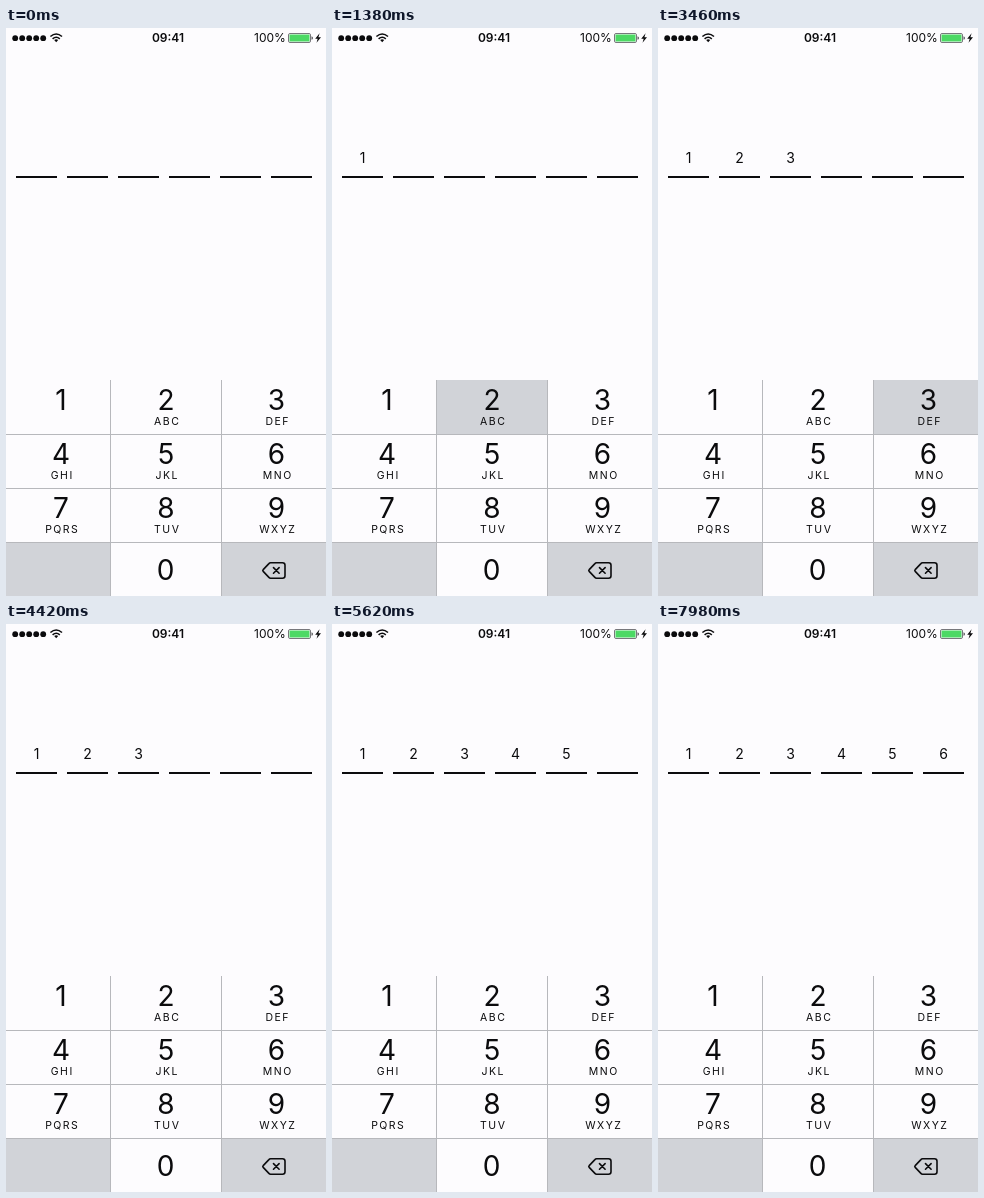
An HTML page for the animation above (8 s loop, 320 px wide and 568 px high).

```html
<!DOCTYPE html>
<html lang="en">
<head>
<meta charset="utf-8">
<title>Passcode entry</title>
<style>
html, body { margin: 0; height: 100%; overflow: hidden; background: #fdfcfe; }
svg { display: block; width: 320px; height: 568px; font-family: Inter, Roboto, sans-serif; fill: #0b0b0d; }
text { text-anchor: middle; }
.num { font-size: 28px; }
.abc { font-size: 10.5px; letter-spacing: 1.5px; }
.code { font-size: 14px; }
.bar { font-size: 12px; }
.key { fill: #d1d3d8; }
.line { fill: #b7b8bc; }
</style>
</head>
<body>
<svg id="stage" viewBox="0 0 320 568">
  <g id="dots"></g>
  <g fill="none" stroke="#0b0b0d" stroke-width="1.6">
    <path d="M44.4 8.5Q50.2 3.5 56 8.5M46.6 10.8Q50.2 7.7 53.8 10.8"/>
  </g>
  <path d="M48.2 12.1Q50.2 10.5 52.2 12.1L50.2 14.2Z"/>
  <text class="bar" x="162" y="14.4" font-weight="600">09:41</text>
  <text class="bar" x="264" y="14.4">100%</text>
  <rect x="282.5" y="5.5" width="22" height="9" rx="1.5" fill="none" stroke="#77777b"/>
  <rect x="283.5" y="6.5" width="20" height="7" rx=".5" fill="#4cd964"/>
  <path d="M305.5 8.2Q307 8.6 307 10T305.5 11.8Z" fill="#55555a"/>
  <path d="M313.6 5.2L309.2 10.8H311.7L310.5 14.8L315 9.2H312.4Z"/>
  <g id="pad"></g>
  <g fill="none" stroke="#0b0b0d" stroke-width="1.6" stroke-linecap="round" stroke-linejoin="round">
    <path d="M264.6 534.8H276.5Q279 534.8 279 537.3V547.7Q279 550.2 276.5 550.2H264.6Q263.6 550.2 262.9 549.4L257.2 543.4Q256.3 542.5 257.2 541.6L262.9 535.6Q263.6 534.8 264.6 534.8Z"/>
    <path d="M267.5 539.6L273.1 545.2M273.1 539.6L267.5 545.2"/>
  </g>
</svg>
<script>
const LOOP = 8000;
// press, digit shown, release (ms) for keys 1 to 6
const TAPS = [
  [500, 580, 740], [1380, 1620, 1860], [3180, 3420, 3620],
  [4460, 4660, 4860], [5220, 5420, 5620], [6220, 6420, 6620]
];
const LETTERS = ['', 'ABC', 'DEF', 'GHI', 'JKL', 'MNO', 'PQRS', 'TUV', 'WXYZ'];
const EDGES = [0, 105, 215, 320], MIDS = [55, 160, 270.5];
const $ = id => document.getElementById(id);
const stage = $('stage'), pad = $('pad');

function add(parent, tag, attrs, text = '') {
  const el = document.createElementNS('http://www.w3.org/2000/svg', tag);
  for (const name in attrs) el.setAttribute(name, attrs[name]);
  el.textContent = text;
  return parent.appendChild(el);
}
const rect = (parent, cls, x, y, width, height) =>
  add(parent, 'rect', { class: cls, x, y, width, height });
const label = (parent, cls, x, y, text) => add(parent, 'text', { class: cls, x, y }, text);
const keyBox = (col, row) =>
  rect(pad, 'key', EDGES[col], 352 + 54 * row, EDGES[col + 1] - EDGES[col], 54);
const show = (el, on) => el.style.visibility = on ? 'visible' : 'hidden';

for (let i = 0; i < 5; i++) add($('dots'), 'circle', { cx: 9.2 + 7 * i, cy: 10.2, r: 2.9 });

const keys = TAPS.map((_, i) => keyBox(i % 3, Math.floor(i / 3)));
keyBox(0, 3);
keyBox(2, 3);
for (const y of [406, 460, 514]) rect(pad, 'line', 0, y, 320, 1);
for (const x of [104, 215]) rect(pad, 'line', x, 352, 1, 216);

LETTERS.forEach((abc, i) => {
  const x = MIDS[i % 3], y = 382 + 54 * Math.floor(i / 3);
  label(pad, 'num', x, y, i + 1);
  label(pad, 'abc', x + 1.25, y + 15, abc);
});
label(pad, 'num', 159.5, 551.5, 0);

const digits = TAPS.map((_, i) => {
  rect(stage, '', 10 + 51 * i, 148, 41, 2);
  return label(stage, 'code', 30.5 + 51 * i, 135, i + 1);
});

function draw() {
  const t = performance.now() % LOOP;
  TAPS.forEach(([press, typed, release], i) => {
    show(keys[i], t >= press && t < release);
    show(digits[i], t >= typed);
  });
  requestAnimationFrame(draw);
}
draw();
</script>
</body>
</html>
```
